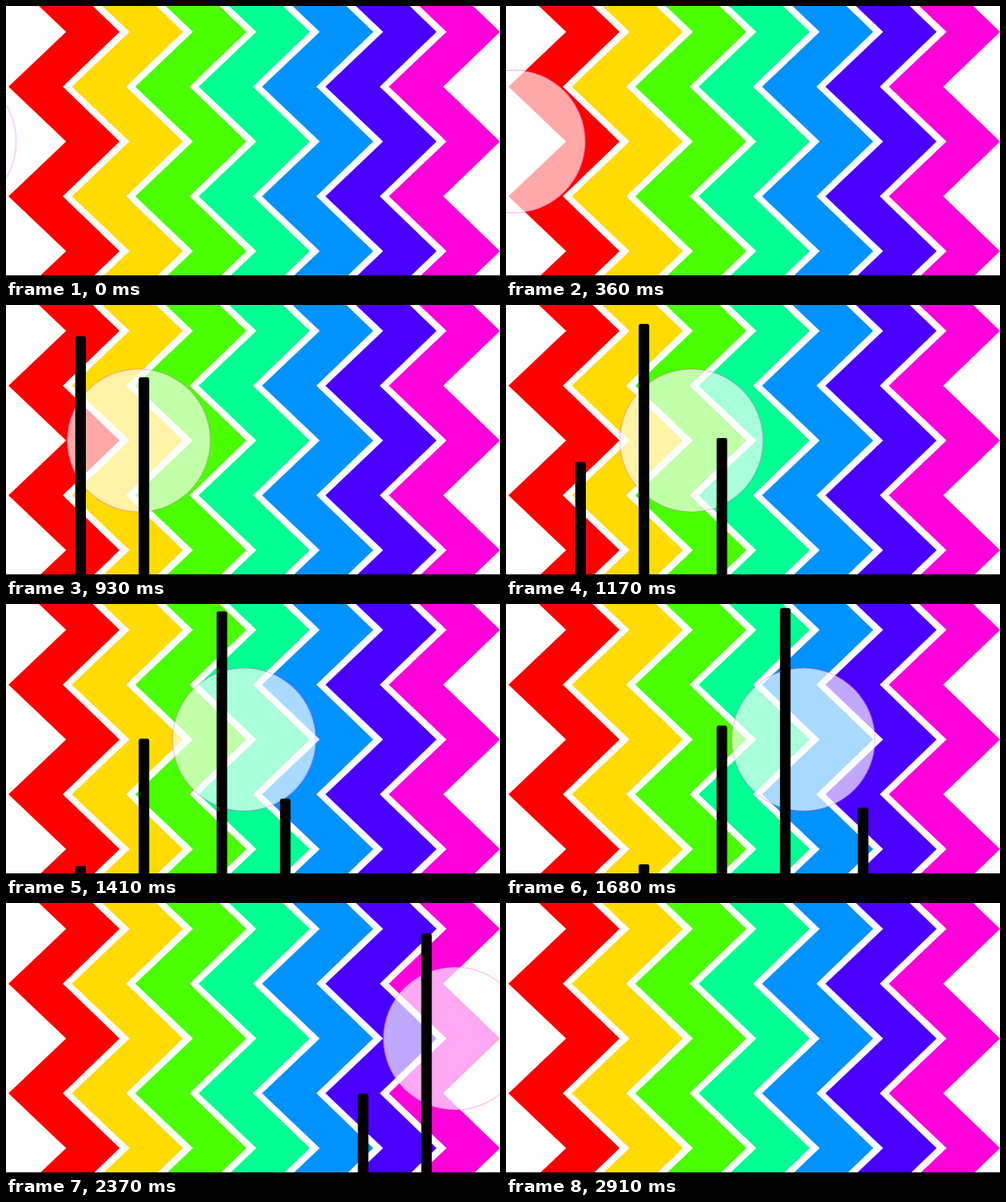
These frames come from a looping animation (600 by 330 pixels, 2.94 s). An HTML page:

```html
<!DOCTYPE html>
<html lang="en">
<head>
<meta charset="utf-8">
<title>Zigzag spectrum</title>
<style>
  html, body { margin: 0; width: 100%; height: 100%; overflow: hidden; background: #fff; }
  svg { display: block; width: 600px; height: 330px; }
</style>
</head>
<body>
<svg id="stage" viewBox="0 0 600 330"></svg>
<script>
const LOOP = 2940;
const stage = document.getElementById('stage');

function add(tag, attrs) {
  const el = document.createElementNS('http://www.w3.org/2000/svg', tag);
  for (const name in attrs) el.setAttribute(name, attrs[name]);
  stage.appendChild(el);
  return el;
}

function loop(el, frames) {
  el.animate(frames, { duration: LOOP, iterations: Infinity }).startTime = 0 + startTime;
}
const startTime = document.timeline.currentTime || 0;

// Zigzag bands: turning points alternate right and left every 66.75px.
const turns = [-35.25, 31.5, 98.25, 165, 231.75, 298.5, 365.25];
const edge = (left, right) => turns.map((y, i) => [i % 2 ? right : left, y]);
for (let i = 0; i < 7; i++) {
  const x = 77 * i;
  const points = [...edge(3 + x, 73 + x), ...edge(69 + x, 138 + x).reverse()];
  add('polygon', { points: points.join(' '), fill: `hsl(${i * 360 / 7}, 100%, 50%)` });
}

// Pale disc crossing at constant speed.
const disc = add('circle', {
  cx: 0, cy: 165, r: 87,
  fill: '#fff', 'fill-opacity': 0.66,
  stroke: '#ff00db', 'stroke-opacity': 0.35, 'stroke-width': 1
});
loop(disc, [{ transform: 'translateX(-87px)' }, { transform: 'translateX(697px)' }]);

// Bars spring up quickly and sink at half the speed, one after another.
const LOW = 330, HIGH = 2, RISE = 352, FALL = 723;
const peaks = [774, 1052, 1344, 1637, 1915, 2216];
const sine = 'cubic-bezier(.37, 0, .63, 1)';
const at = (time, y, easing = 'linear') =>
  ({ offset: time / LOOP, transform: `translateY(${y}px)`, easing });

peaks.forEach((peak, i) => {
  const x = 84.2 + 171.6 * Math.floor(i / 2) + 77 * (i % 2);
  const bar = add('rect', { x, y: 0, width: 12.8, height: 340, rx: 2.5 });
  loop(bar, [
    at(0, LOW),
    at(peak - RISE, LOW, sine),
    at(peak, HIGH, sine),
    at(Math.min(peak + FALL, LOOP), LOW),
    at(LOOP, LOW)
  ]);
});

add('rect', { x: 0, y: 328, width: 600, height: 2 });
</script>
</body>
</html>
```
